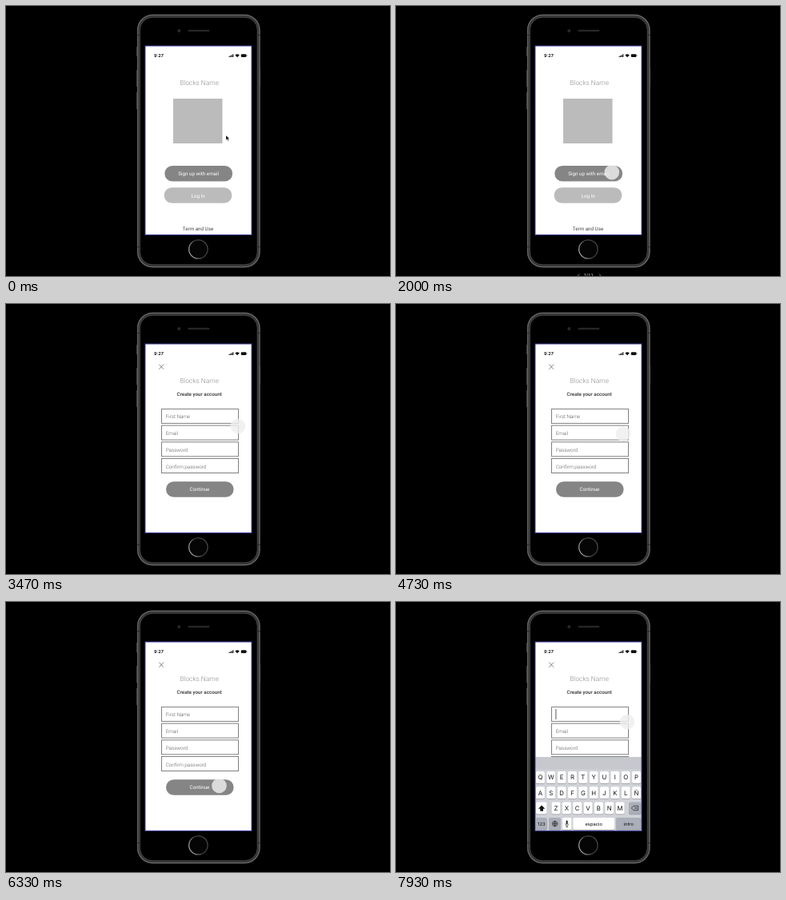
Write an HTML page that moves like this. It is 480x338 px and loops after 8 s.

```html
<!DOCTYPE html>
<html lang="en">
<head>
<meta charset="utf-8">
<title>Sign-up prototype</title>
<style>
html, body { margin: 0; width: 100%; height: 100%; overflow: hidden; background: #000; }
svg { display: block; width: 100vw; height: 100vh; }
text { font: 400 6.25px Roboto, sans-serif; text-rendering: geometricPrecision; }
.mid { text-anchor: middle; }
.title { font-size: 8.4px; font-weight: 300; fill: #8c8c8c; }
.label { font-weight: 300; fill: #555; }
.white { fill: #fff; }
.key { font: 400 7.8px Inter, "Liberation Sans", sans-serif; fill: #111; }
.small { font: 500 5.7px Inter, "Liberation Sans", sans-serif; fill: #222; }
.field { fill: #fff; stroke: #808080; stroke-width: 1; }
</style>
</head>
<body>
<svg viewBox="0 0 480 338" xmlns="http://www.w3.org/2000/svg">
  <defs>
    <linearGradient id="ring" x1="0" y1=".7" x2="1" y2=".3">
      <stop offset="0" stop-color="#b0b0b0"/><stop offset=".5" stop-color="#3c3c3c"/><stop offset="1" stop-color="#4a4a4a"/>
    </linearGradient>
    <clipPath id="glass"><rect x="174" y="50" width="133" height="236.4"/></clipPath>
  </defs>
  <rect width="480" height="338" fill="#000"/>

  <g id="phone">
    <path d="M163.4 51v12M163.4 80v21M163.4 108v21M317.6 78v23" stroke="#3c3c3c" stroke-width="1.2"/>
    <rect x="165.7" y="12.4" width="150.2" height="313.2" rx="17.5" fill="#000" stroke="#343434" stroke-width="3.6"/>
    <rect x="164.7" y="11.4" width="152.2" height="315.2" rx="18.5" fill="none" stroke="#666" stroke-width="1.3"/>
    <rect x="167.4" y="14.1" width="146.8" height="309.8" rx="15.8" fill="none" stroke="#505050" stroke-width=".8"/>
    <path d="M164 36.5h3.4M314.5 36.5h3.4M164 301.5h3.4M314.5 301.5h3.4" stroke="#282828"/>
    <circle cx="216.3" cy="31" r="2" fill="#292929"/>
    <rect x="227.5" y="29.8" width="27" height="2.2" rx="1.1" fill="#272727"/>
    <circle cx="240.4" cy="304.5" r="11.7" fill="#050505" stroke="url(#ring)" stroke-width="1.2"/>
  </g>

  <rect x="174" y="50" width="133" height="236.4" fill="#fff"/>
  <g id="status">
    <text x="185" y="64.1" style="font:600 5.5px Inter,sans-serif">9:27</text>
    <path d="M279.1 64v-1.3M280.7 64v-2M282.3 64v-2.8M283.9 64v-3.7" stroke="#111" stroke-width="1.1"/>
    <path d="M286.4 61.6q2.7-2.5 5.4 0l-2.7 2.6z" fill="#111"/>
    <rect x="293.8" y="60.3" width="6.6" height="3.7" rx="1" fill="#111"/>
    <path d="M301 61.5v1.3" stroke="#111" stroke-width=".6"/>
  </g>
  <text class="mid title" x="241.7" y="98.6">Blocks Name</text>

  <g id="welcome">
    <rect x="209" y="116" width="61.5" height="56" fill="#bbb"/>
    <rect x="198.3" y="200" width="84.8" height="19.6" rx="9.8" fill="#858585"/>
    <text class="mid white" x="240.7" y="212">Sign up with email</text>
    <rect x="197.6" y="227.2" width="84.8" height="19.6" rx="9.8" fill="#bbb"/>
    <text class="mid white" x="240.2" y="239.5">Log In</text>
    <text class="mid" x="240" y="280.8" fill="#444">Term and Use</text>
  </g>

  <g id="signup">
    <path d="M191.3 75.5l5.8 6.2M197.1 75.5l-5.8 6.2" stroke="#555" stroke-width=".7"/>
    <text class="mid" x="241.7" y="115.4" fill="#333" style="font-weight:500">Create your account</text>
    <g id="fields"></g>
    <rect x="200" y="222.2" width="84.6" height="19.6" rx="9.8" fill="#858585"/>
    <text class="mid white" x="242" y="234.4">Continue</text>
  </g>

  <g id="typing" clip-path="url(#glass)">
    <path d="M199.9 134v13" stroke="#444" stroke-width=".9"/>
    <rect x="174" y="194" width="133" height="93" fill="#d0d2d7"/>
    <rect x="174" y="194" width="133" height="15.5" fill="#c6c8ce"/>
    <g id="keys"></g>
    <path d="M182.1 254.4l4.2 4.3h-2.3v3h-3.8v-3h-2.3z" fill="#111"/>
    <path d="M294.3 258l2.7-2.8h5.6v5.6h-5.6zM298.3 256.6l2.8 2.8M301.1 256.6l-2.8 2.8" fill="none" stroke="#222" stroke-width=".7"/>
    <g fill="none" stroke="#222" stroke-width=".6">
      <circle cx="198.6" cy="277.6" r="3.3"/>
      <ellipse cx="198.6" cy="277.6" rx="1.5" ry="3.3"/>
      <path d="M195.3 277.6h6.6M198.6 274.3v6.6M211.6 277.6q0 2.4 2 2.4t2-2.4M213.6 280v1.6M212.2 281.6h2.8"/>
    </g>
    <rect x="212.6" y="273.6" width="2" height="5" rx="1" fill="#222"/>
  </g>

  <rect x="174" y="50" width="133" height="236.4" fill="none" stroke="#4646a8" stroke-width="1"/>

  <g id="pager" fill="none" stroke="#999" stroke-width=".8">
    <path d="M229.3 335.6l-2.2 2.6 2.2 2.6M254 335.6l2.2 2.6-2.2 2.6"/>
    <text class="mid" x="240.8" y="339.3" fill="#ddd" stroke="none" style="font-size:5.6px">1/11</text>
  </g>
  <path id="arrow" d="M0 0v5.8l1.4-1.2 1 2.2 1-.5-1-2.1h1.9z" fill="#000" stroke="#fff" stroke-width=".3"/>
  <circle id="touch" r="9.3"/>
</svg>

<script>
const LOOP = 8000;
const $ = id => document.getElementById(id);

function add(parent, tag, attrs, text) {
  const el = document.createElementNS("http://www.w3.org/2000/svg", tag);
  for (const name in attrs) el.setAttribute(name, attrs[name]);
  if (text) el.textContent = text;
  parent.append(el);
  return el;
}

const labels = ["First Name", "Email", "Password", "Confirm password"].map((name, i) => {
  const y = 131.4 + i * 20.7;
  add($("fields"), "rect", { class: "field", x: 194.5, y, width: 96, height: 18 });
  return add($("fields"), "text", { class: "label", x: 199.8, y: y + 11.1 + i * .3 }, name);
});

function key(x, y, w, label, cls = "key", fill = "#fff") {
  add($("keys"), "rect", { x, y: y + .7, width: w, height: 15, rx: 1.8, fill: "#92959c" });
  add($("keys"), "rect", { x, y, width: w, height: 15, rx: 1.8, fill });
  const base = cls === "key" ? 10.3 : 9.6;
  add($("keys"), "text", { class: "mid " + cls, x: x + w / 2, y: y + base }, label);
}

function row(letters, start, y) {
  [...letters].forEach((c, i) => key(start + i * 13.35 - 5.5, y, 11, c));
}

const GREY = "#abafb9";
row("QWERTYUIOP", 180.4, 212);
row("ASDFGHJKLÑ", 180.4, 231.2);
row("ZXCVBNM", 200, 250.5);
key(175, 250.5, 13.6, "");
key(291.2, 250.5, 15, "", "key", GREY);
key(175, 270, 13.6, "123", "small", GREY);
key(191, 270, 15, "", "key", GREY);
key(207.7, 270, 11.8, "");
key(221.2, 270, 52, "espacio", "small");
key(275, 270, 31.4, "intro", "small", GREY);

// time, x, y
const arrowPath = [[0, 275, 162], [65, 275, 162], [130, 278, 162], [930, 278, 162]];
const touchPath = [
  [930, 277, 169], [1130, 273, 183], [1400, 270, 196], [1730, 268, 207],
  [1800, 268, 208], [2130, 271, 208.3], [2270, 270.5, 208.3],
  [3180, 270.5, 208.3], [3330, 280, 182], [3470, 290, 153], [3800, 287, 142],
  [4050, 287, 142], [4530, 284, 161], [4700, 284, 161], [5070, 284, 180],
  [5360, 284, 180], [5670, 282, 218], [5930, 271, 229], [6130, 267, 231],
  [6330, 266.5, 230], [7290, 266.5, 230], [7500, 279, 182], [7670, 287, 151],
  [7860, 287, 151], [7930, 289, 150]
];
const pagerFade = [[930, 0], [1130, 1], [2670, 1], [3000, 0]];

function at(track, t) {
  if (t <= track[0][0]) return track[0].slice(1);
  const i = track.findIndex(p => p[0] > t);
  if (i < 0) return track[track.length - 1].slice(1);
  const a = track[i - 1], b = track[i];
  const k = (t - a[0]) / (b[0] - a[0]);
  return a.slice(1).map((v, j) => v + (b[j + 1] - v) * k);
}

const show = (el, on) => el.style.display = on ? "" : "none";
const move = (el, [x, y]) => el.setAttribute("transform", `translate(${x} ${y})`);

function draw(t) {
  const form = t >= 2870, typing = t >= 6660, touch = t >= 930;
  show($("welcome"), !form);
  show($("signup"), form);
  show($("typing"), typing);
  show(labels[0], !typing);
  show($("arrow"), !touch);
  show($("touch"), touch);
  move($("arrow"), at(arrowPath, t));
  move($("touch"), at(touchPath, t));
  const pressed = t >= 2660 && t < 2930;
  $("touch").setAttribute("fill", pressed ? "rgba(205,205,205,.72)" : "rgba(238,238,238,.82)");
  $("touch").setAttribute("stroke", pressed ? "#d6d6d6" : "none");
  $("touch").setAttribute("stroke-width", .7);
  $("pager").setAttribute("opacity", at(pagerFade, t)[0]);
}

const start = performance.now();
function tick() {
  draw((performance.now() - start) % LOOP);
  requestAnimationFrame(tick);
}
tick();
</script>
</body>
</html>
```
